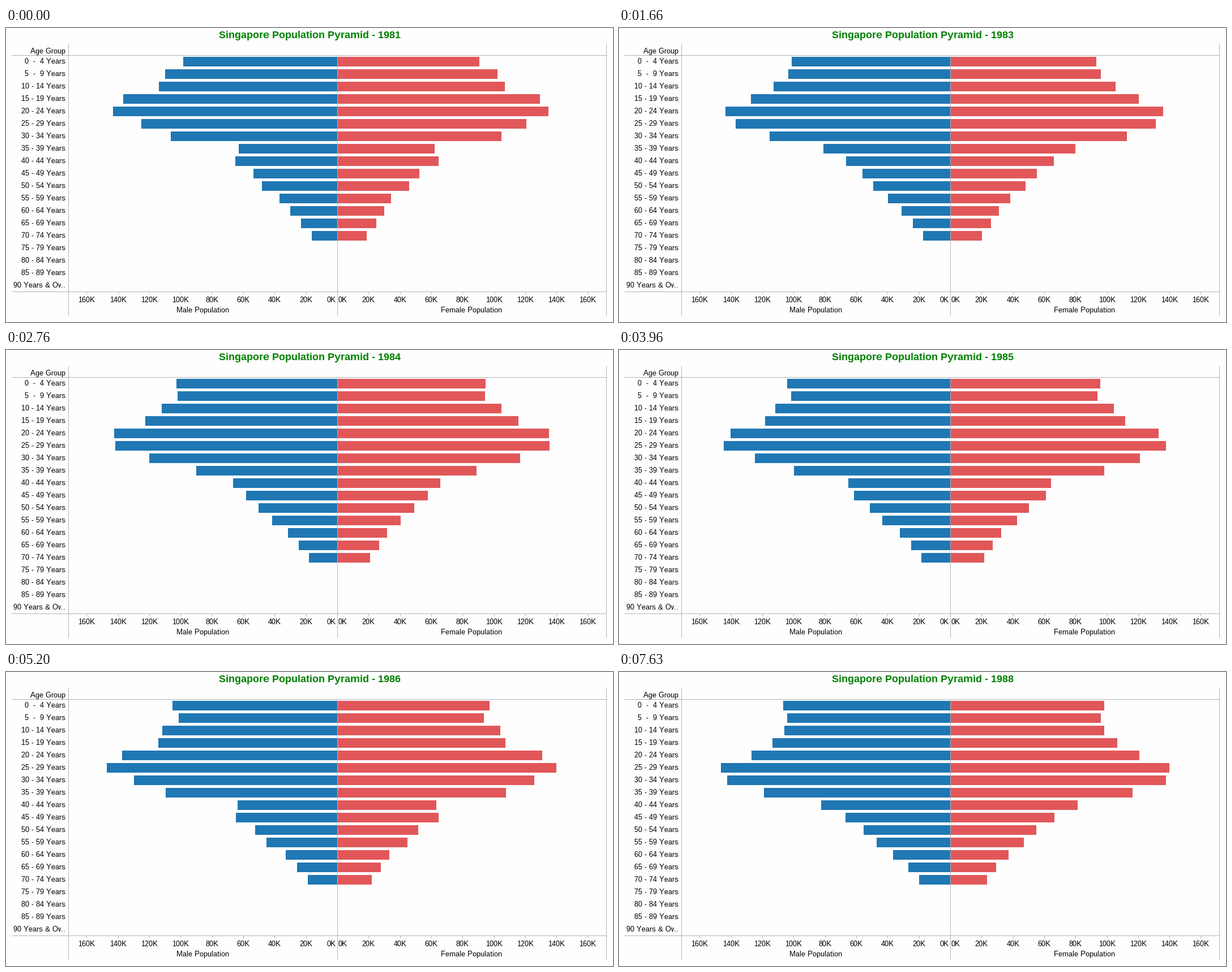
A matplotlib script that plays this animation: 1072 px wide and 520 px high, repeating every 8000 ms.

```python
import matplotlib.pyplot as plt
import numpy as np
from matplotlib.animation import FuncAnimation
from matplotlib.patches import Rectangle

W, H, DPI = 1072, 520, 100
LOOP, STEP = 8000, 20
ZERO, ROW, TOP, ROWS = 585, 22, 51, 15
BACK, GRID, BLUE, RED = "#fefefe", "#b3b3b3", "#1f77b4", "#e15759"

# All curves run over cohorts: 0 is the group aged 0-4 in 1981, 1 is aged 5-9, ...
# Bar length of the men of each cohort in 1981
MEN = [(-1, 283), (0, 272), (0.5, 279), (1, 304), (2, 315), (3, 378), (3.5, 394),
       (4, 396), (4.5, 380), (5, 346), (6, 294), (7, 174), (7.5, 185), (8, 180),
       (8.5, 158), (9, 148), (10, 133), (11, 102), (14, 45)]
# Women per man in 1981
SHARE = [(0, 0.923), (3, 0.946), (4, 0.942), (6, 0.986), (8, 0.994),
         (9, 0.98), (11, 0.93), (12, 1.0), (14, 1.156)]
# Growth of a cohort over five years
MEN_GROWTH = [(0, 1.03), (2.5, 0.995), (4.5, 1.04), (6, 1.03), (9, 0.98), (13, 0.81)]
WOMEN_GROWTH = [(0, 1.03), (2.5, 1.0), (4.5, 1.05), (9, 0.985), (11, 0.968), (13, 0.89)]

# (year, time the bars change, time the title follows)
CHANGES = [(1981, 0, 0), (1982, 360, 400), (1983, 1560, 1660),
           (1984, 2730, 2760), (1985, 3960, 3960), (1986, 5160, 5200),
           (1987, 6330, 6330), (1988, 7630, 7630)]

# Whole-pixel letter spacing without kerning
plt.rcParams.update({"font.family": "Liberation Sans", "text.hinting": "native",
                     "text.hinting_factor": 1, "text.kerning_factor": 6})
fig = plt.figure(figsize=(W / DPI, H / DPI), dpi=DPI, facecolor=BACK)
ax = fig.add_axes([0, 0, 1, 1])
ax.set_xlim(0, W)
ax.set_ylim(H, 0)
ax.axis("off")


def curve(points, x):
    return np.interp(x, *zip(*points))


def lengths(year):
    """Bar lengths of men and women: every cohort moves down one row in five years."""
    age = (year - 1981) / 5
    cohort = np.arange(ROWS) - age
    men = curve(MEN, cohort)
    women = men * curve(SHARE, cohort)
    return (np.round(men * curve(MEN_GROWTH, cohort) ** age),
            np.round(women * curve(WOMEN_GROWTH, cohort) ** age))


def box(x, y, w, h, color):
    return ax.add_patch(Rectangle((x, y), w, h, color=color, lw=0, antialiased=False))


def label(x, y, text, ha="center", px=13, **style):
    return ax.text(x, y, text, ha=ha, va="baseline", fontsize=px * 72 / DPI, **style)


title = label(536, 18, "", px=18, color="#008000", weight="bold")

label(105, 45, "Age Group", "right")
groups = ["0  -  4 Years", "5  -  9 Years"]
groups += [f"{a} - {a + 4} Years" for a in range(10, 90, 5)] + ["90 Years & Ov.."]
for i, name in enumerate(groups):
    label(105, 63 + ROW * i, name, "right")

male_bars = [box(ZERO, TOP + ROW * i, 0, 17, BLUE) for i in range(ROWS)]
female_bars = [box(ZERO + 1, TOP + ROW * i, 0, 17, RED) for i in range(ROWS)]

for y in (48, 466):
    box(10, y, 1051, 1, GRID)
for x, y in ((110, 28), (ZERO, 48), (1060, 28)):
    box(x, y, 1, 509 - y, GRID)

label(583, 485, "0K", "right")
label(587, 485, "0K", "left")
for k in range(1, 9):
    for x in (ZERO - 55.35 * k, ZERO + 55.3 * k):
        box(round(x), 467, 1, 4, GRID)
        label(round(x), 485, f"{20 * k}K")
label(347.5, 503, "Male Population")
label(822.5, 503, "Female Population")


def draw(i):
    t = i * STEP + STEP / 2
    shown = max(year for year, bars, _ in CHANGES if bars <= t)
    named = max(year for year, _, head in CHANGES if head <= t)
    title.set_text(f"Singapore Population Pyramid - {named}")
    men, women = lengths(shown)
    for left, right, m, w in zip(male_bars, female_bars, men, women):
        left.set_x(ZERO - m)
        left.set_width(m)
        right.set_width(w - 1)
    return [title, *male_bars, *female_bars]


anim = FuncAnimation(fig, draw, frames=LOOP // STEP, interval=STEP,
                     init_func=lambda: draw(0), repeat=True, repeat_delay=0)
plt.show()
```
